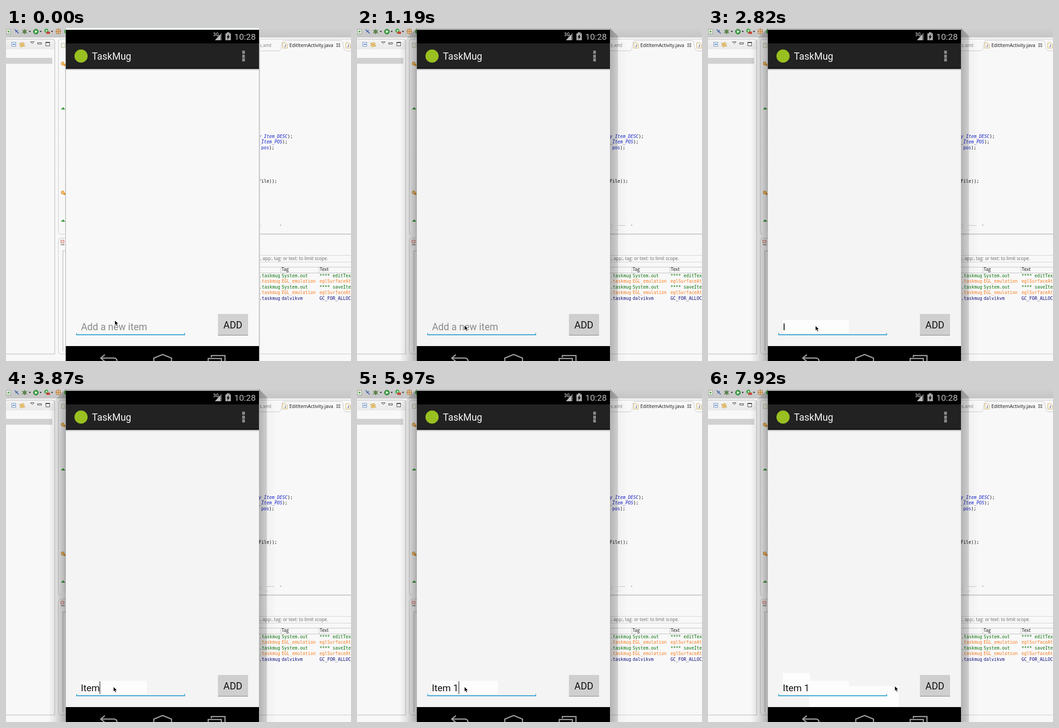
Animation, 761 px wide and 736 px high, one loop 8 s. Source, as an HTML page:

```html
<!DOCTYPE html>
<html lang="en">
<head>
<meta charset="utf-8">
<title>To-do list demo</title>
<style>
  html, body { margin: 0; width: 100%; height: 100%; overflow: hidden; background: #f8f8f8; }
  svg { display: block; width: 761px; height: 736px; }
  text { white-space: pre; }
  .app { font-family: Roboto, sans-serif; }
  .ui { font: 9.9px "Open Sans", sans-serif; }
  .code { font: 9.6px "DejaVu Sans Mono", monospace; }
  .line { fill: none; stroke: #c6c6c6; }
</style>
</head>
<body>
<svg viewBox="0 0 761 736">
  <defs>
    <linearGradient id="bar" x2="0" y2="1">
      <stop stop-color="#d0d0d0"/><stop offset="1" stop-color="#c6c6c6"/>
    </linearGradient>
    <linearGradient id="head" x2="0" y2="1">
      <stop stop-color="#f3f3f3"/><stop offset="1" stop-color="#e9e9e9"/>
    </linearGradient>
    <linearGradient id="shadeL">
      <stop stop-color="#000" stop-opacity="0"/><stop offset=".35" stop-color="#000" stop-opacity=".08"/>
      <stop offset=".7" stop-color="#000" stop-opacity=".19"/><stop offset="1" stop-color="#000" stop-opacity=".3"/>
    </linearGradient>
    <linearGradient id="shadeR">
      <stop stop-color="#000" stop-opacity=".28"/><stop offset=".42" stop-color="#000" stop-opacity=".17"/>
      <stop offset=".46" stop-color="#000" stop-opacity=".03"/><stop offset="1" stop-color="#000" stop-opacity="0"/>
    </linearGradient>
    <g id="bulb">
      <rect x="-4" y="-4" width="6" height="7" rx="2" fill="#f3c069" stroke="#c98a35"/>
      <rect x="1" y="0" width="4" height="5" fill="#e09a3c"/>
    </g>
    <path id="up" d="M-5 2L0 -3L5 2Z" fill="#3c9a3c"/>
    <g id="file">
      <path d="M.5 .5H7L10.500 4V12.500H.5Z" fill="#fdf8e8" stroke="#c9ab6a"/>
      <path d="M6.500 4V8.500Q6.500 10 4 9.500" fill="none" stroke="#6b78b8" stroke-width="1.500"/>
    </g>
  </defs>

  <g id="ide">
    <rect width="761" height="736" fill="#f8f8f8"/>
    <rect width="761" height="20" fill="url(#bar)"/>
    <path class="line" d="M0 20.500H761"/>

    <rect x="1" y="3" width="9" height="10" fill="#f4f4ea" stroke="#8a9a8a"/>
    <path d="M3 8H8M5.500 5.500V10.500" stroke="#3c9a3c" stroke-width="1.500"/>
    <path d="M19 3L28 12M21 9L26 5" stroke="#4a68b0" stroke-width="1.800"/>
    <circle cx="41" cy="8" r="3.500" fill="#7fae62" stroke="#486a38"/>
    <path d="M35 4L47 12M35 12L47 4M41 2V14" stroke="#486a38"/>
    <circle cx="66" cy="8" r="5.500" fill="#3fa545" stroke="#247030"/>
    <path d="M64 5L69.500 8L64 11Z" fill="#fff"/>
    <circle cx="89" cy="6" r="4.500" fill="#3fa545"/><path d="M88 4L92 6L88 8.500Z" fill="#fff"/>
    <rect x="89" y="8" width="8" height="5" fill="#c8483a"/>
    <path d="M50 6.500H55L52.500 9.500ZM74 6.500H79L76.500 9.500ZM99 6.500H104L101.500 9.500Z" fill="#222"/>
    <rect x="111" y="3" width="9" height="9" fill="#e9c692" stroke="#a9713a"/>
    <path d="M115.500 1V14M109 7.500H122" stroke="#a9713a"/>
    <circle cx="133" cy="8" r="5" fill="#3fa545"/>

    <path d="M0 24H101Q107 24 107 31V47H0Z" fill="url(#head)"/>
    <path class="line" d="M0 24.500H101Q107.500 24.500 107.500 31V720.500H0" stroke-width="1.500"/>
    <rect x="12.500" y="31.500" width="9" height="9" fill="#e9f1fb" stroke="#6e94c2"/>
    <path d="M14.500 36H20" stroke="#3b62a0" stroke-width="1.500"/>
    <path d="M30 33.500H36V31L41 35L36 38V36H30ZM41 38H35V36L30 39.500L35 42.500V40.500H41Z" fill="#f4d47e" stroke="#c2913c" stroke-width=".8"/>
    <path d="M54 30.500H62L58 34.500Z" fill="#fff" stroke="#333"/>
    <rect x="70" y="32.500" width="8" height="3" fill="#fff" stroke="#333"/>
    <rect x="88" y="31.500" width="8" height="8" fill="#fff" stroke="#333"/>
    <path d="M87.500 32H96.500" stroke="#333" stroke-width="2"/>
    <rect y="66" width="102" height="13" fill="#d1d1d1"/>

    <path class="line" d="M132 24.500H122Q115.500 24.500 115.500 31V449Q115.500 455.500 122 455.500H132M132 464.500H122Q115.500 464.500 115.500 471V714Q115.500 720.500 122 720.500H132"/>
    <path d="M132 492.500H125.500V714" fill="none" stroke="#aaa"/>
    <path d="M130.500 80V446" stroke="#aaa" stroke-dasharray="1 4"/>
    <rect x="122" y="34" width="8" height="9" fill="#f7f6ea" stroke="#a9b89a"/>
    <use href="#bulb" x="126" y="79"/><use href="#bulb" x="126" y="364"/>
    <use href="#up" x="126" y="178"/><use href="#up" x="126" y="426"/>
    <rect x="121" y="469" width="7" height="6" fill="#f3d8d4" stroke="#c2675c"/>
    <path d="M121 479H129" stroke="#888" stroke-width="2"/>

    <path class="line" d="M558 24.500H761M558 50.500H601Q606 50 607 44L609 31Q610 27.500 614 27.500H737Q742 27.500 743 32L745 44Q746 50 751 50.500H761" stroke="#dedede"/>
    <use href="#file" x="610" y="32"/><use href="#file" x="749" y="32"/>
    <text class="ui" x="559" y="42" style="font-size:10.700px" fill="#777">s.xml</text>
    <text class="ui" x="625" y="42" style="font-size:10.400px" fill="#111">EditItemActivity.java</text>
    <path d="M729.500 34.500H731.500L733 36.500L734.500 34.500H736.500V36.500L734.500 38L736.500 39.500V41.500H734.500L733 39.500L731.500 41.500H729.500V39.500L731.500 38L729.500 36.500Z" fill="#fff" stroke="#333"/>
    <path class="line" d="M558 455.500H761" stroke-width="2"/>
    <path d="M558 434.500H564M560 447V439H564" fill="none" stroke="#ddd"/>
    <rect x="605" y="435" width="2" height="1.500" fill="#777"/>

    <path d="M558 502.500H761M558 517.500H761" stroke="#d0d0d0"/>
    <text class="ui" x="556" y="513" fill="#666">l:, app:, tag: or text: to limit scope.</text>
    <path d="M558 528.500H761M558 541.500H761M606.500 529V541M690.500 529V541" stroke="#bdbdbd"/>
    <text class="ui" x="608" y="537" fill="#111">Tag</text>
    <text class="ui" x="692" y="537" style="font-size:10.300px" fill="#111">Text</text>
    <path class="line" d="M558 720.500H761"/>
    <g id="code" class="code"></g>
  </g>

  <g id="shadow">
    <path d="M94 38L132 0V736H94Z" fill="url(#shadeL)"/>
    <path d="M558 0L598 40V736H558Z" fill="url(#shadeR)"/>
    <rect x="132" width="426" height="4" fill="#bcbcbc"/>
    <path d="M115 455.500H132M558 446.500H578M558 436.500H592" stroke="#bdbdbd"/>
  </g>
  <g id="edge">
    <rect x="132" width="426" height="4" fill="#eff5f0"/>
    <path d="M131.500 4V736M558.500 4V736" stroke="#a9a9a9"/>
    <path d="M560 24V736" stroke="#e4e4e4" stroke-width="2"/>
  </g>

  <g id="phone" class="app">
    <rect x="132" y="4" width="426" height="732"/>
    <rect x="132" y="34" width="426" height="55" fill="#222"/>
    <rect id="page" x="132" y="90" width="426" height="613"/>
    <rect x="132" y="88.500" width="426" height="2"/>
    <rect x="132" y="90.500" width="426" height="2.500" fill="#c9c9c9"/>
    <text x="457" y="18" font-size="10" font-weight="500" fill="#ccc">3G</text>
    <path d="M461 27H476V10Z" fill="#555"/><path d="M461 27H473V13.500Z" fill="#bbb"/>
    <path d="M484 12H487V9.500H493V12H496V27H484Z" fill="#aaa"/>
    <path d="M492 13L486.500 20.500H489.500L488 26L493.500 18.500H490.500Z"/>
    <text x="503.500" y="26" font-size="19" fill="#bdbdbd">10:28</text>
    <circle cx="165.500" cy="62" r="14.500" fill="#99c020"/>
    <text x="189.500" y="70" font-size="21.200" fill="#f3f3f3">TaskMug</text>
    <path d="M521 50h6v7h-6zM521 59h6v7h-6zM521 67h6v7h-6z" fill="#888"/>
    <g fill="none" stroke="#a2a2a2" stroke-width="2.500">
      <path d="M218 722L209 729.500L218 737M209 729.500H238Q245 729.500 245 738"/>
      <path d="M326 738V729.500L345.500 721.500L365 729.500V738"/>
      <path d="M453 728V724H483V738M446 738V730.500H475V738"/>
    </g>
    <g id="patches"></g>
    <path d="M155 674H156.500V677H393.500V674H395V679H155Z" fill="#2f9fd0"/>
    <rect x="467.500" y="677" width="66.500" height="3" rx="1" fill="#aaa"/>
    <rect id="button" x="467.500" y="632" width="66.500" height="46" rx="1"/>
    <text x="479.500" y="664" font-size="21.300" fill="#111">ADD</text>
    <text id="field"></text>
    <rect id="caret" y="646" width="1.300" height="28" fill="#222"/>
  </g>
  <path id="mouse" d="M0 0V11L2.600 8.700L4.400 13L6.400 12.100L4.600 8H8Z" fill="#000" stroke="#fff" stroke-width=".8"/>
</svg>

<script>
const LOOP = 8000;
const $ = id => document.getElementById(id);

function add(parent, tag, attrs, text = '') {
  const el = document.createElementNS('http://www.w3.org/2000/svg', tag);
  for (const key in attrs) el.setAttribute(key, attrs[key]);
  el.textContent = text;
  parent.append(el);
  return el;
}

function codeLine(x, y, fill, text, style = '') {
  add($('code'), 'text', { x, y, fill, style }, text);
}

const BLUE = '#1420c8', italic = 'font-style:italic';
codeLine(557.500, 243, BLUE, 'y_Item_DESC', italic);
codeLine(621, 243, '#111', ');');
codeLine(557.500, 255, BLUE, '_Item_POS', italic);
codeLine(609.500, 255, '#111', ');');
codeLine(563, 268, BLUE, 'pos');
codeLine(580.300, 268, '#111', ');');
codeLine(557.500, 342, '#111', 'File));');

const logs = [
  ['#0a700a', 'System.out', '**** editText'],
  ['#f87f20', 'EGL_emulation', 'eglSurfaceAttrib'],
  ['#0a700a', 'System.out', '**** saveItem'],
  ['#f87f20', 'EGL_emulation', 'eglSurfaceAttrib'],
  ['#10107c', 'dalvikvm', 'GC_FOR_ALLOC']
];
logs.forEach(([fill, tag, msg], i) => {
  const y = Math.round(551 + i * 12.400);
  codeLine(558.500, y, fill, '.taskmug');
  codeLine(608, y, fill, tag);
  codeLine(691.500, y, fill, msg);
});

// Brighter repaint areas: from, to, x, y, width, height
const patches = [
  [590, 1190, 234, 642, 15, 27],
  [1040, 1190, 165, 645, 80, 29],
  [2820, LOOP, 165, 645, 146, 29],
  [6120, LOOP, 165, 628, 60, 46],
  [7770, LOOP, 223, 657, 89, 45],
  [7920, LOOP, 302, 657, 118, 45]
].map(([from, to, x, y, width, height]) => ({
  from, to,
  el: add($('patches'), 'rect', { x, y, width, height, fill: to < LOOP ? '#fbfbfb' : '#fdfdfd' })
}));

// Each step overrides part of the state before it
const steps = [
  [0, { mouse: [240, 646], caret: 0, text: '', y: 668, shadow: false }],
  [450, { caret: 165 }],
  [590, { mouse: [239.500, 643.500] }],
  [740, { mouse: [239, 643] }],
  [890, { mouse: [236, 656] }],
  [1040, { caret: 0 }],
  [1190, { mouse: [237, 657], shadow: true }],
  [1480, { mouse: [237, 658], caret: 165 }],
  [2080, { caret: 0 }],
  [2820, { text: 'I' }],
  [2970, { text: 'It', caret: 178 }],
  [3120, { text: 'Ite', caret: 188 }],
  [3870, { text: 'Item', caret: 206.500 }],
  [4320, { caret: 0 }],
  [4770, { text: 'Item ', caret: 212 }],
  [4920, { text: 'Item 1', caret: 224 }],
  [5370, { caret: 0 }],
  [5970, { caret: 224 }],
  [6120, { y: 643.500, caret: 165 }],
  [6720, { caret: 0 }],
  [7170, { y: 668, caret: 224 }],
  [7770, { mouse: [303, 704], caret: 0 }],
  [7920, { mouse: [412, 656.500] }]
];

const show = (el, on) => el.setAttribute('visibility', on ? 'visible' : 'hidden');

function draw(t) {
  const s = Object.assign({}, ...steps.filter(([at]) => at <= t).map(step => step[1]));
  $('mouse').setAttribute('transform', `translate(${s.mouse})`);
  show($('caret'), s.caret);
  $('caret').setAttribute('x', s.caret);
  const field = $('field');
  field.textContent = s.text || 'Add a new item';
  field.setAttribute('x', s.text ? 165 : 165.500);
  field.setAttribute('y', s.y);
  field.setAttribute('font-size', s.text ? 20.900 : 21.200);
  field.setAttribute('fill', s.text ? '#111' : '#8a8a8a');
  show($('shadow'), s.shadow);
  show($('edge'), !s.shadow);
  $('page').setAttribute('fill', s.shadow ? '#f4f4f4' : '#f8f8f8');
  $('button').setAttribute('fill', s.shadow ? '#cfcfcf' : '#d2d2d2');
  for (const p of patches) show(p.el, t >= p.from && t < p.to);
}

const start = performance.now();
function tick() {
  draw((performance.now() - start) % LOOP);
  requestAnimationFrame(tick);
}
tick();
</script>
</body>
</html>
```
